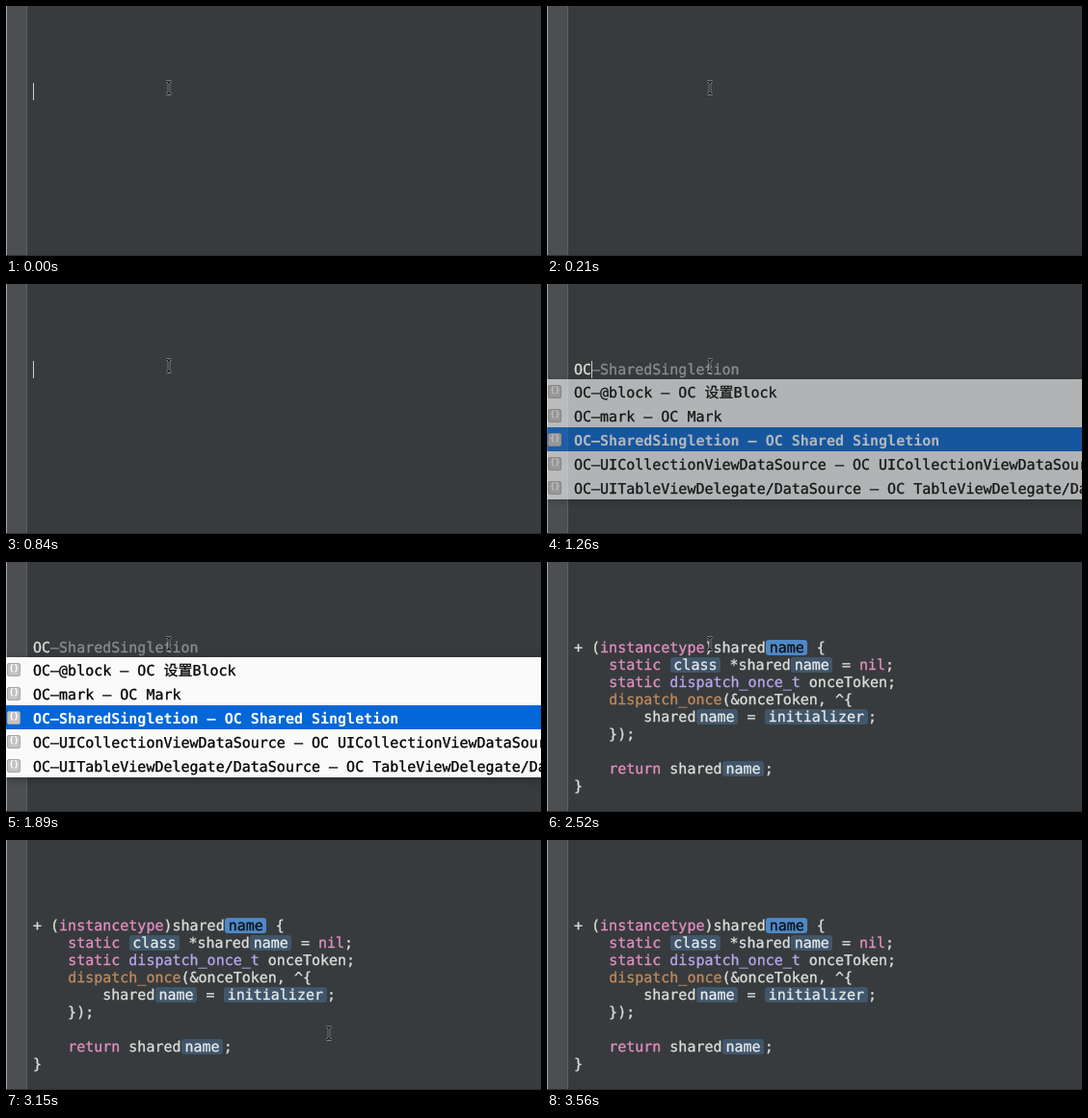
These frames come from a looping animation (555x260 px, 3900 ms). An HTML page:

```html
<!DOCTYPE html>
<html lang="en">
<head>
<meta charset="utf-8">
<title>Snippet completion</title>
<style>
html, body { margin: 0; width: 100%; height: 100%; overflow: hidden; background: #373b3d; }
body { position: relative; font: 15px/18px "DejaVu Sans Mono", "Noto Sans CJK SC", "Noto Sans CJK", monospace; color: #dcdfda; text-rendering: geometricPrecision; -webkit-text-stroke: .3px; }
body > * { position: absolute; }
#gutter { left: 0; top: 0; width: 20px; height: 260px; background: #4b4f52; border: solid #5d6163; border-width: 0 1px; border-left-color: #a3a5a6; }
#edge { left: 0; top: 259px; width: 555px; height: 1px; background: #2d3032; }
pre { left: 28px; top: 80px; margin: 0; font: inherit; }
#typed i { font-style: normal; color: #8a8d8c; }
#caret { top: 80px; width: 1px; height: 18px; background: #cfcfc2; }
#popup { left: 0; top: 99px; width: 555px; height: 125px; background: #fafafa; color: #000; box-shadow: 0 2px 8px rgba(0,0,0,.35); }
.row { position: relative; height: 25px; padding-left: 28px; line-height: 28px; white-space: pre; overflow: hidden; }
.row.on { background: #0467d8; color: #fff; font-weight: bold; -webkit-text-stroke: 0; }
.row::before { content: "{}"; position: absolute; left: 1px; top: 6px; width: 12px; height: 12px; border: 1px solid #a6a6a6; border-radius: 2px; background: #c2c2c2; color: #fff; font: bold 9px/11px "DejaVu Sans Mono", monospace; letter-spacing: -.5px; text-align: center; -webkit-text-stroke: 0; }
#code b { font-weight: normal; color: #e48fc0; }
#code u { text-decoration: none; color: #b9a5ee; }
#code em { font-style: normal; color: #bf8a5c; }
#code span { display: inline-block; height: 16px; line-height: 16px; padding: 0 4px; position: relative; z-index: 0; color: #e6eaec; }
#code span::before { content: ""; position: absolute; inset: 0 .5px; border-radius: 3px; background: #41566a; z-index: -1; }
#code .sel { color: #0c1014; }
#code .sel::before { background: #4f88c6; }
</style>
</head>
<body>
<div id="gutter"></div>
<div id="edge"></div>
<pre id="typed">OC<i>–SharedSingletion</i></pre>
<pre id="code">+ (<b>instancetype</b>)shared<span class="sel">name</span> {
    <b>static</b> <span>class</span> *shared<span>name</span> = <b>nil</b>;
    <b>static</b> <u>dispatch_once_t</u> onceToken;
    <em>dispatch_once</em>(&amp;onceToken, ^{
        shared<span>name</span> = <span>initializer</span>;
    });

    <b>return</b> shared<span>name</span>;
}</pre>
<div id="caret"></div>
<div id="popup">
<div class="row">OC–@block – OC 设置Block</div>
<div class="row">OC–mark – OC Mark</div>
<div class="row on">OC–SharedSingletion – OC Shared Singletion</div>
<div class="row">OC–UICollectionViewDataSource – OC UICollectionViewDataSource</div>
<div class="row">OC–UITableViewDelegate/DataSource – OC TableViewDelegate/DataSource</div>
</div>
<svg id="mouse" width="8" height="16" fill="none">
<defs><path id="beam" d="M1.5 1.5Q4 1.5 4 3.5Q4 1.5 6.5 1.5M4 3V13M1.5 14.5Q4 14.5 4 12.5Q4 14.5 6.5 14.5"/></defs>
<use href="#beam" stroke="#c4c6c7" stroke-width="2.4"/>
<use href="#beam" stroke="#0c0e0f" stroke-width="1.3"/>
</svg>
<script>
const LOOP = 3900, OPEN = 1260, INSERT = 2520;
const $ = id => document.getElementById(id).style;
const show = (id, on) => $(id).visibility = on ? "visible" : "hidden";
// Pointer stops: start time, left, top
const stops = [[0, 165, 77], [2940, 167, 84], [3150, 331, 193], [3360, 450, 217]];
const start = performance.now();

function draw(now) {
  const t = Math.max(0, now - start) % LOOP;
  const listing = t >= OPEN && t < INSERT;
  show("typed", listing);
  show("popup", listing);
  show("code", t >= INSERT);
  $("popup").opacity = t < 1470 ? 0.63 : 1;

  show("caret", t < 210 || (t >= 840 && t < 1890));
  $("caret").left = (t < OPEN ? 28 : 46) + "px";

  const [, x, y] = stops.filter(s => s[0] <= t).pop();
  show("mouse", t < 3560);
  $("mouse").left = x + "px";
  $("mouse").top = y + "px";
  requestAnimationFrame(draw);
}
draw(start);
</script>
</body>
</html>
```
